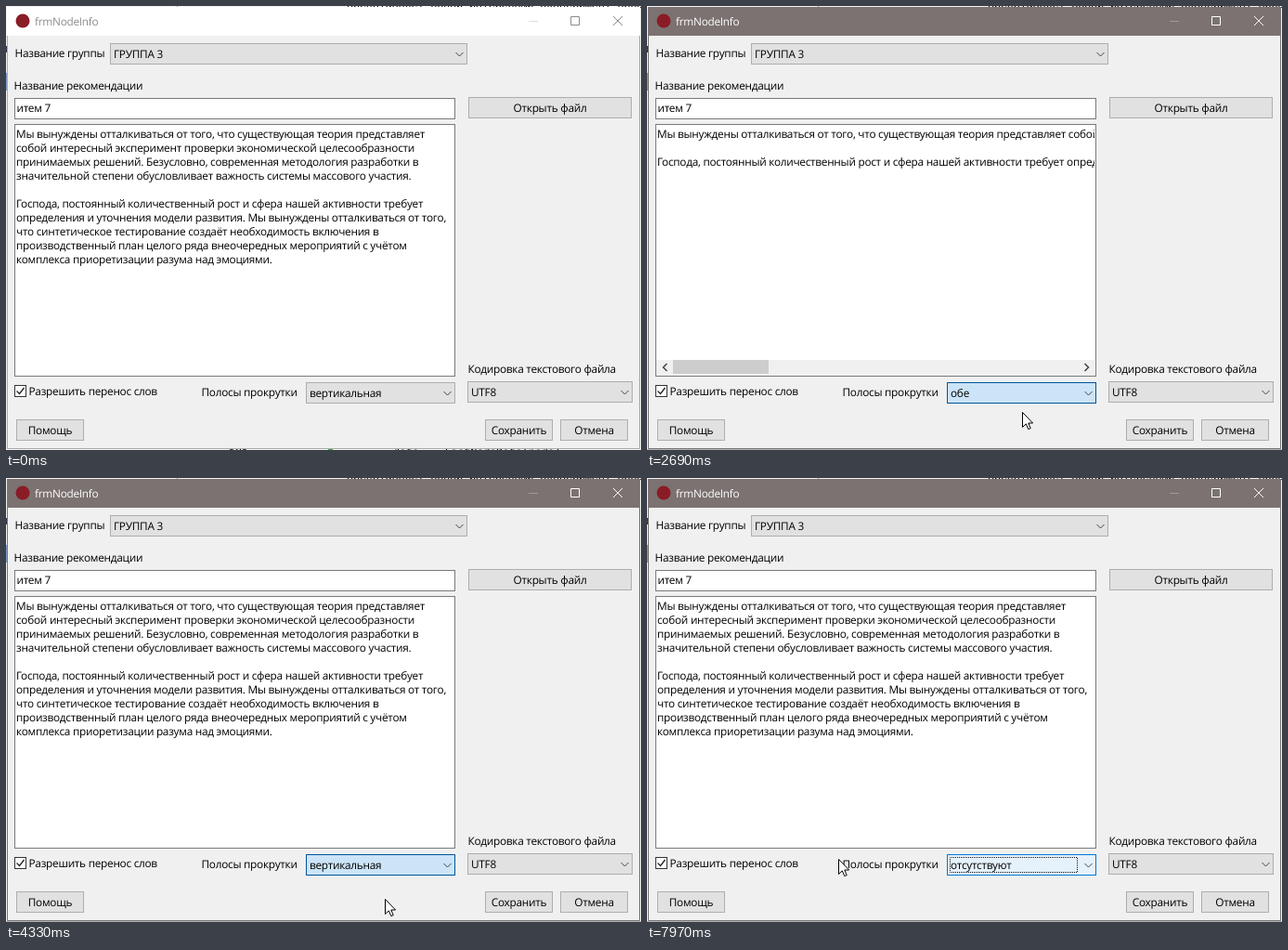
Animation of 684 by 478 pixels, one loop 8 s. Source, as an HTML page:

```html
<!DOCTYPE html>
<html lang="ru">
<head>
<meta charset="utf-8">
<title>frmNodeInfo</title>
<style>
  html, body { margin: 0; width: 100%; height: 100%; overflow: hidden; background: #fff; }
  svg { display: block; width: 684px; height: 478px; }
  text {
    font: 11.8px "Open Sans", "Noto Sans", sans-serif; letter-spacing: -.26px;
    text-rendering: geometricPrecision; white-space: pre;
  }
  .code { font: 12px "Liberation Mono", monospace; }
  .mid { text-anchor: middle; }
  .line { fill: none; stroke: #444; }
</style>
</head>
<body>
<svg id="stage" viewBox="0 0 684 478" xmlns="http://www.w3.org/2000/svg"></svg>
<script>
const LOOP = 8000, TICK = 40;
const LIST_TOP = 429, ROW = 15;
const OPTIONS = ['обе', 'вертикальная', 'горизонтальная', 'отсутствуют'];
const WRAPPED = [
  'Мы вынуждены отталкиваться от того, что существующая теория представляет',
  'собой интересный эксперимент проверки экономической целесообразности',
  'принимаемых решений. Безусловно, современная методология разработки в',
  'значительной степени обусловливает важность системы массового участия.',
  '',
  'Господа, постоянный количественный рост и сфера нашей активности требует',
  'определения и уточнения модели развития. Мы вынуждены отталкиваться от того,',
  'что синтетическое тестирование создаёт необходимость включения в',
  'производственный план целого ряда внеочередных мероприятий с учётом',
  'комплекса приоретизации разума над эмоциями.'
];
const UNWRAPPED = [WRAPPED.slice(0, 2).join(' '), '', WRAPPED.slice(5, 7).join(' ')];

// Markup helpers
const fill = (x, y, w, h, color, extra = '') =>
  `<rect x="${x}" y="${y}" width="${w}" height="${h}" fill="${color}" ${extra}/>`;
const box = (x, y, w, h, color, stroke, extra = '') =>
  fill(x + .5, y + .5, w - 1, h - 1, color, `stroke="${stroke}" ${extra}`);
const label = (x, y, s, extra = '') => `<text x="${x}" y="${y}" ${extra}>${s}</text>`;
const path = (d, extra = '') => `<path class="line" d="${d}" ${extra}/>`;
const face = (x, y, w, extra) => box(x, y, w, 23, '#e1e1e1', '#adadad', extra);
const combo = (x, y, w, s, overlay = '') =>
  face(x, y, w) + overlay + label(x + 4, y + 15.5, s, overlay && 'id="choice"') +
  path(`M${x + w - 12.5} ${y + 10}l4 4l4 -4`);
const button = (x, y, w, s) => face(x, y, w) + label(x + w / 2, y + 16, s, 'class="mid"');
const lines = list => list.map((s, i) => label(11, 142 + ROW * i, s)).join('');

const caption = (bar, ink, dim) =>
  fill(1, 1, 682, 31, bar) +
  '<circle cx="18" cy="16" r="7.5" fill="#8a1c25"/>' +
  label(31, 20.5, 'frmNodeInfo', `fill="${ink}"`) +
  path('M563 16.5h10', `style="stroke:${dim}"`) +
  path('M608.5 11.5h9v9h-9z', `style="stroke:${ink}"`) +
  path('M654 11l10 10m0 -10l-10 10', `style="stroke:${ink}"`);

const backdrop =
  fill(0, 0, 684, 478, '#f4f4f4') + fill(184, 0, 1, 2, '#999') +
  label(367, 2, 'представляет собой интересный эксперимент проверки', 'class="code"') +
  label(417, 484, 'data. = ListNodeData(node),', 'class="code" font-weight="bold"') +
  label(240, 484, '121', 'class="code"') + fill(347, 477, 5, 1, '#3fae3f') +
  fill(0, 43, 1, 7, '#335') + fill(0, 72, 1, 19, '#7e9ccb');

const scrollbar =
  fill(10, 381, 473, 17, '#f0f0f0') + fill(28, 381, 103, 15, '#cdcdcd') +
  path('M21.5 385l-4 4l4 4M471.5 385l4 4l-4 4', 'stroke-width="1.5"');

const dropdown =
  fill(484, 432, 3, 46, '#000', 'opacity=".3"') +
  box(323, 428, 161, 66, '#fff', '#3c6c9c') +
  fill(324, LIST_TOP, 159, ROW, '#0078d7', 'id="mark"') +
  OPTIONS.slice(0, 3).map((s, i) => label(327, LIST_TOP + 12 + ROW * i, s, 'class="option"')).join('');

const glow =
  box(323, 405, 161, 23, '#e5f1fb', '#0078d7', 'id="hover"') +
  box(323, 405, 161, 23, '#cce4f7', '#005499', 'id="pressed"');

document.getElementById('stage').innerHTML =
  `<defs><clipPath id="memoClip">${fill(10, 128, 472, 270, '#000')}</clipPath>
   <clipPath id="dropClip"><rect id="dropSize" x="320" y="428" width="170" height="50"/></clipPath></defs>` +
  backdrop +
  box(1, 1, 682, 476, '#f0f0f0', '#aaa') +
  caption('#fff', '#8c8c8c', '#ddd') +
  `<g id="active">${caption('#7b7271', '#fff', '#a09897')}` +
  path('M1.5 31V476.5H682.5V31', 'style="stroke:#777"') + fill(0, 477, 684, 1, '#b5b5b5') + '</g>' +
  label(9.5, 55, 'Название группы') + combo(112, 40, 385, 'ГРУППА 3') +
  label(8.5, 90, 'Название рекомендации') +
  box(9, 99, 475, 23, '#fff', '#7a7a7a') + label(11.5, 114, 'итем 7') +
  button(498, 98, 176, 'Открыть файл') +
  box(9, 127, 475, 272, '#fff', '#7a7a7a') +
  `<g clip-path="url(#memoClip)"><g id="wrapped">${lines(WRAPPED)}</g>
   <g id="unwrapped">${lines(UNWRAPPED)}${scrollbar}</g></g>` +
  box(9, 408, 13, 13, '#fff', '#333') + path('M11.5 414.5l3 3l5 -6.5', 'style="stroke:#222;stroke-width:1.3"') +
  label(24.5, 419, 'Разрешить перенос слов') +
  label(210.5, 420, 'Полосы прокрутки') + combo(323, 405, 161, OPTIONS[1], glow) +
  box(326, 408, 138, 17, 'none', '#111', 'id="focus" stroke-dasharray="1" stroke-dashoffset=".5"') +
  label(497.5, 395, 'Кодировка текстового файла') + combo(497, 404, 178, 'UTF8') +
  button(11, 445, 73, 'Помощь') + button(516, 445, 73, 'Сохранить') + button(597, 445, 73, 'Отмена') +
  `<g id="drop" clip-path="url(#dropClip)">${dropdown}</g>` +
  '<path id="cursor" d="M.5 .5V16.5L4.3 12.9L6.8 18.6L9.2 17.6L6.8 12H11.6Z" fill="#fff" stroke="#000"/>';

// The user's actions; everything else follows from them.
const APPEAR = 490;
const MOVES = [
  { by: 1250, took: 760, to: [414, 415] },
  { by: 2330, took: 320, to: [404, 437] },
  { by: 3330, took: 240, to: [414, 422] },
  { by: 4050, took: 240, to: [408, 453] },
  { by: 4850, took: 280, to: [405, 424] },
  { by: 5810, took: TICK, to: [405, 421] },
  { by: 7970, took: 200, to: [206, 410] }
];
const MENUS = [{ from: 1570, to: 2690, pick: 0 }, { from: 3530, to: 4330, pick: 1 }];
const KEYS = [5410, 6130];

const clamp = v => Math.min(1, Math.max(0, v));
const pointer = t => MOVES.reduce((p, { by, took, to }) => {
  const k = clamp((t - by + took) / took);
  return p.map((v, i) => v + (to[i] - v) * k);
}, [452, 500]);
const openMenu = t => MENUS.find(m => t >= m.from && t < m.to);
const choice = t =>
  MENUS.reduce((v, m) => t >= m.to ? m.pick : v, 1) + KEYS.filter(k => t >= k).length;

function isHot(t) {
  const [x, y] = pointer(t);
  const inside = x >= 323 && x < 484 && y >= 405 && y < 428;
  return inside || openMenu(t) || t >= KEYS[0];
}
// Share of the last ticks spent hot, which makes the highlight fade.
function hoverLevel(t, ticks = 8) {
  let hot = 0;
  for (let i = 0; i < ticks; i++) if (isHot(t - i * TICK)) hot++;
  return hot / ticks;
}
function pressLevel(t) {
  const clicks = MENUS.flatMap(m => [m.from, m.to]).filter(c => c <= t);
  return clicks.length ? clamp(1 - (t - clicks.pop()) / 240) : 0;
}

const el = id => document.getElementById(id);
const set = (id, name, value) => el(id).setAttribute(name, value);
const show = (id, on) => set(id, 'visibility', on ? 'visible' : 'hidden');
const options = document.querySelectorAll('.option');

function render(now) {
  const t = Math.max(0, Math.floor((now % LOOP - 10) / TICK) * TICK + 10);
  const [x, y] = pointer(t).map(Math.round);
  const value = choice(t), menu = openMenu(t);
  const unwrapped = value % 2 === 0;
  const marked = y >= LIST_TOP ? Math.floor((y - LIST_TOP) / ROW) : value;

  set('active', 'opacity', clamp((t - APPEAR + TICK) / 160));
  set('hover', 'opacity', hoverLevel(t));
  set('pressed', 'opacity', pressLevel(t));
  el('choice').textContent = OPTIONS[value];
  show('wrapped', !unwrapped);
  show('unwrapped', unwrapped);
  show('focus', t >= KEYS[0]);
  show('drop', menu);
  if (menu) set('dropSize', 'height', 50 * clamp((t - menu.from + TICK) / 160));
  set('mark', 'y', LIST_TOP + ROW * marked);
  options.forEach((o, i) => o.setAttribute('fill', i === marked ? '#fff' : '#000'));
  show('cursor', t >= APPEAR);
  set('cursor', 'transform', `translate(${x} ${y})`);
}

function frame() {
  render(performance.now());
  requestAnimationFrame(frame);
}
frame();
</script>
</body>
</html>
```
